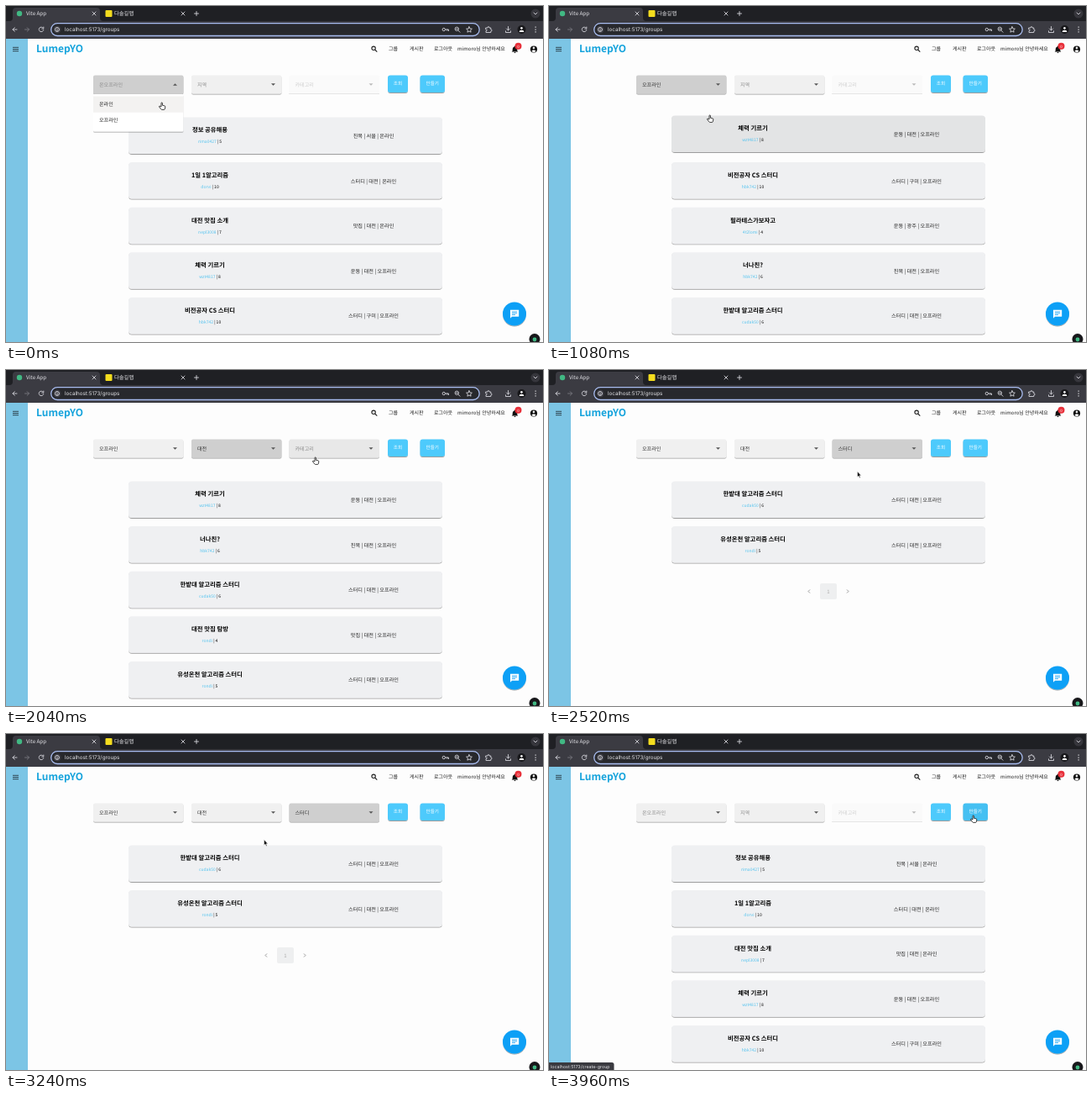
These frames come from a looping animation (640x400 px, 4200 ms). An HTML page:

```html
<!DOCTYPE html>
<html>
<head>
<meta charset="utf-8">
<title>Group search</title>
<style>
  html, body { margin: 0; width: 100%; height: 100%; overflow: hidden; background: #fdfdfd; }
  svg { display: block; }
  text { font-family: 'Noto Sans CJK KR', 'Noto Sans', sans-serif; text-rendering: geometricPrecision; white-space: pre; }
  .ui { font-family: Inter, 'Noto Sans CJK KR', sans-serif; fill: #e6e6ea; }
  .mid { text-anchor: middle; }
  .line { fill: none; stroke: #d2d2d8; stroke-width: .9; stroke-linecap: round; stroke-linejoin: round; }
  .shadow { filter: url(#shadow); }
</style>
</head>
<body>
<svg width="640" height="400" viewBox="0 0 640 400">
  <defs>
    <filter id="shadow" x="-5%" y="-10%" width="110%" height="130%">
      <feDropShadow dx="0" dy="1" stdDeviation=".7" flood-opacity=".38"/>
    </filter>
  </defs>

  <!-- browser -->
  <rect width="640" height="39" fill="#1f2024"/>
  <path d="M4 18q4 0 4-4V6q0-4 4-4h96q4 0 4 4v8q0 4 4 4h524v21H0V18z" fill="#3b3b42"/>
  <circle cx="16" cy="9" r="3.2" fill="#41b883"/>
  <rect x="118.5" y="5" width="8" height="8" rx="1" fill="#f3dc1e"/>
  <g class="ui" font-size="6.3">
    <text x="24" y="11.3">Vite App</text>
    <text x="129" y="11.3">다솔길맵</text>
  </g>
  <path class="line" d="M103 7l4 4m0-4l-4 4M209 7l4 4m0-4l-4 4M224.500 9h5m-2.500-2.500v5"/>
  <circle cx="631" cy="9" r="5.500" fill="#36363c"/>
  <path class="line" d="M629 8l2 2 2-2"/>
  <rect x="53.700" y="20.700" width="510.500" height="14.800" rx="7.400" fill="#27282c" stroke="#a9bdf0" stroke-width="1.300"/>
  <circle cx="61" cy="28" r="4.500" fill="#3b3b42"/>
  <path class="line" d="M13 28H8m2.300-2.300L8 28l2.300 2.300"/>
  <path class="line" d="M22.500 28h5m-2.300-2.300l2.300 2.300-2.300 2.300" style="stroke:#77777e"/>
  <path class="line" d="M44.300 26.200a2.800 2.800 0 1 0 .5 2.300M44.800 25v2h-2"/>
  <path class="line" d="M61 27.800v2M61 26v.1M63.500 28a2.500 2.500 0 1 0-5 0a2.500 2.500 0 1 0 5 0"/>
  <text class="ui" x="70" y="30.300" font-size="6.300">localhost:5173/groups</text>
  <path class="line" d="M523.500 28a1.700 1.700 0 1 0-3.400 0a1.700 1.700 0 1 0 3.400 0h4v1.600m-1.600-1.600v1.300"/>
  <path class="line" d="M539.500 27.300a2.200 2.200 0 1 0-4.400 0a2.200 2.200 0 1 0 4.400 0m-.7 1.700l2.200 2.200m-4.600-3.900h1.800"/>
  <path class="line" d="M552 24.700l1 2.200 2.400.3-1.800 1.600.5 2.400-2.100-1.200-2.100 1.200.5-2.400-1.800-1.600 2.400-.3z"/>
  <path class="line" d="M572 26h2q0-1.500 1-1.500t1 1.500h1.800v2q1.300 0 1.300 1t-1.300 1v1.500H572v-1.800q1.300-.2 1.300-1T572 27.800z"/>
  <path class="line" d="M598.500 24.500v4.500m-2-2l2 2 2-2m-5 2.800v1.700h6v-1.700"/>
  <circle cx="614.500" cy="28" r="5" fill="#17171a"/>
  <path d="M614.500 25a1.400 1.400 0 1 1-.1 0zM611.700 31q0-2.300 2.800-2.300t2.800 2.300z" fill="#fff"/>
  <path d="M630.500 24.500h1.300v1.300h-1.300zm0 2.900h1.300v1.300h-1.300zm0 2.900h1.300v1.300h-1.300z" fill="#d2d2d8"/>

  <!-- page frame -->
  <rect y="39" width="26" height="361" fill="#7cc5e5"/>
  <path d="M8 49.300h7M8 51.500h7M8 53.700h7" stroke="#26363f" stroke-width=".9"/>
  <text x="36" y="55.300" font-size="12" font-weight="700" fill="#15a3dc">LumepYO</text>
  <path d="M440.300 50.300a2.200 2.200 0 1 0-4.400 0a2.200 2.200 0 1 0 4.400 0m-.6 1.700l2.600 2.600" fill="none" stroke="#222" stroke-width="1.100"/>
  <g font-size="6" fill="#222">
    <text x="456" y="53.300">그룹</text>
    <text x="481" y="53.300">게시판</text>
    <text x="510" y="53.300">로그아웃</text>
    <text x="538" y="53.300">mimoro님 안녕하세요</text>
  </g>
  <path d="M602.700 54.500l1-1.200v-2q0-2.300 2-2.800 0-.9.800-.9t.8.900q2 .5 2 2.800v2l1 1.200zM605.500 55h2q0 1-1 1t-1-1z" fill="#111"/>
  <circle cx="610.500" cy="47.700" r="4" fill="#e8303a"/>
  <text class="mid" x="610.500" y="49.500" font-size="4.500" fill="#fff">0</text>
  <circle cx="629" cy="51.500" r="4.100" fill="#111"/>
  <path d="M629 48.600a1.300 1.300 0 1 1-.1 0zM626.500 53.800q.5-1.600 2.500-1.600t2.500 1.600q-1 1.200-2.500 1.200t-2.500-1.200z" fill="#fff"/>
  <circle class="shadow" cx="606" cy="366.500" r="14" fill="#0fa0f6"/>
  <path d="M601 361.700h10.200v8h-8.200l-2 2z" fill="#fff"/>
  <path d="M603 364h6.200m-6.200 1.800h6.200m-6.200 1.800h4" stroke="#0fa0f6" stroke-width=".8"/>
  <circle cx="630" cy="396.500" r="6.500" fill="#18181b"/>
  <circle cx="630" cy="397" r="2.400" fill="#41b883"/>
  <g id="app"></g>
</svg>
<script>
const STEP = 120, LOOP = 4200, LAST = 3960;
const INK = '#222';

const groups = [
  ['정보 공유해용', 'rima0427', 5, '친목 | 서울 | 온라인'],
  ['1일 1알고리즘', 'dorvi', 10, '스터디 | 대전 | 온라인'],
  ['대전 맛집 소개', 'nepl3008', 7, '맛집 | 대전 | 온라인'],
  ['체력 기르기', 'wzt4817', 8, '운동 | 대전 | 오프라인'],
  ['비전공자 CS 스터디', 'hbk742', 10, '스터디 | 구미 | 오프라인'],
  ['필라테스가보자고', '4t2lomi', 4, '운동 | 광주 | 오프라인'],
  ['너나친?', 'hbk742', 6, '친목 | 대전 | 오프라인'],
  ['한밭대 알고리즘 스터디', 'cudak50', 6, '스터디 | 대전 | 오프라인'],
  ['대전 맛집 탐방', 'rondi', 4, '맛집 | 대전 | 오프라인'],
  ['유성온천 알고리즘 스터디', 'rondi', 5, '스터디 | 대전 | 오프라인'],
].map(([title, user, size, tags]) => ({ title, user, size, tags }));

const selects = [
  { x: 104, label: '온오프라인', items: ['온라인', '오프라인'], pick: 1, open: 0, close: 1080 },
  { x: 221, label: '지역', items: ['서울', '대전', '광주', '구미', '부울경'], pick: 1, open: 1440, close: 1920 },
  { x: 337.5, label: '카테고리', items: ['스터디', '맛집', '운동', '친목'], pick: 0, open: 2160, close: 2520 },
];
const CLEARED = 3600, RELOADED = 3720;

// time, x, y of the pointer
const path = [
  [0, 187, 119], [360, 188, 121], [720, 192, 133], [1080, 193, 134], [1320, 245, 98],
  [1560, 247, 97], [1800, 249, 136], [2040, 370, 108], [2160, 370, 100], [2400, 368, 122],
  [2520, 368, 124], [3000, 330, 127], [3240, 308, 129], [3360, 330, 142], [3600, 467, 97],
  [3720, 467, 97], [3960, 507, 101],
];

function pointerAt(t) {
  const i = Math.max(1, path.findIndex(p => p[0] >= t));
  const [t0, x0, y0] = path[i - 1], [t1, x1, y1] = path[i];
  const k = (t - t0) / (t1 - t0);
  return { x: x0 + (x1 - x0) * k, y: y0 + (y1 - y0) * k };
}

const inside = (p, x, y, w, h) => p.x >= x && p.x <= x + w && p.y >= y && p.y <= y + h;
const rect = (x, y, w, h, fill, extra = '') =>
  `<rect x="${x}" y="${y}" width="${w}" height="${h}" fill="${fill}" ${extra}/>`;
const text = (x, y, s, size, fill = INK, extra = '') =>
  `<text x="${x}" y="${y}" font-size="${size}" fill="${fill}" ${extra}>${s}</text>`;

function card({ title, user, size, tags }, i, p, blocked) {
  const top = 132.5 + i * 53.6;
  const hover = !blocked && inside(p, 146, top, 374, 43.5);
  const y = hover ? top - 2 : top;
  return rect(146, y, 374, 43.5, hover ? '#e3e4e5' : '#eff0f2', 'rx="4" class="shadow"') +
    text(243, y + 17.8, title, 7.35, '#000', 'class="mid" font-weight="700"') +
    text(243, y + 30.8, `<tspan fill="#56c4ef">${user}</tspan> | ${size}`, 5, '#000', 'class="mid"') +
    text(438, y + 24.4, tags, 6.2, INK, 'class="mid"');
}

function pager(count) {
  const y = 254 + (count - 2) * 53.6;
  return rect(323, y, 20, 19, '#eeeff0', 'rx="2"') +
    text(333, y + 11.7, '1', 6, '#aaa', 'class="mid"') +
    `<path d="M311 ${y + 7.500}l-2 2 2 2M355 ${y + 7.500}l2 2-2 2" fill="none" stroke="#999"/>`;
}

function select({ x, label, open, close }, value, disabled, focused, t, p) {
  const opened = t >= open && t < close;
  const hover = inside(p, x, 82, 107.5, 27);
  const fill = disabled ? '#fafafa' : focused ? '#cfcfcf' : hover ? '#e8e8e8' : '#f0f0f0';
  const ink = disabled ? '#cfcfcf' : value ? '#333' : '#8c8c8c';
  const arrow = opened ? 'm-2.500 1.200h5l-2.500-2.500z' : 'm-2.500-1.200h5l-2.500 2.500z';
  return rect(x, 82.5, 107.5, 22, fill, `rx="2" ${disabled ? '' : 'class="shadow"'}`) +
    (disabled ? `<path d="M${x} 104.500h107.500" stroke="#bbb" stroke-width=".7" stroke-dasharray="1 1"/>` : '') +
    text(x + 7, 95.5, value || label, 6.1, ink) +
    `<path d="M${x + 97.5} 93.500${arrow}" fill="${disabled ? '#bbb' : '#555'}"/>`;
}

function menu({ x, items, pick, close }, t, p) {
  const pitch = 19.25, top = 107.5;
  const rows = items.map((item, i) => {
    const y = top + i * pitch;
    const hover = inside(p, x, y, 107.5, pitch);
    const pressed = i === pick && t >= close - STEP;
    return (hover ? rect(x, y, 107.5, pitch, '#f3f2f1') : '') +
      (pressed ? rect(x + 5, y, 70, pitch, '#b6b6b6', 'rx="4"') : '') +
      text(x + 7, y + 11.7, item, 6.1, '#222');
  });
  return rect(x, 105, 107.5, items.length * pitch + 6, '#fff', 'rx="1.5" class="shadow"') + rows.join('');
}

function button(x, w, label, p) {
  const hover = inside(p, x, 82, w, 21);
  return rect(x, 82.5, w, 20.5, hover ? '#45c0f2' : '#4dcafc', 'rx="3" class="shadow"') +
    text(x + w / 2, 94.3, label, 5.6, '#fff', 'class="mid"');
}

function pointer({ x, y }, hand) {
  return hand
    ? `<path transform="translate(${x - 1} ${y})" fill="#fff" stroke="#111" stroke-width=".8"
        d="M-1-3.200q0-.9.7-.9t.7.900v2.400l2.500.6q1 .3.900 1.300l-.4 2.300q-.2 1-1 1h-2.600q-.7 0-1.200-.7l-2-2.700q-.3-.8.500-.9l1.900.8z"/>`
    : `<path transform="translate(${x - .5} ${y})" fill="#111" stroke="#fff" stroke-width=".5"
        d="M0-3.200v6.700l1.500-1.400 1.100 2.300 1-.5-1-2.200h2z"/>`;
}

function draw(t) {
  const p = pointerAt(t);
  const chosen = until => selects.map(s => t >= s.close && t < until ? s.items[s.pick] : '');
  const values = chosen(CLEARED);
  const filters = chosen(RELOADED).filter(Boolean);
  const shown = groups.filter(g => filters.every(f => g.tags.split(' | ').includes(f))).slice(0, 5);
  const openMenu = selects.find(s => t >= s.open && t < s.close);
  const focus = t < CLEARED ? selects.findLastIndex(s => t >= s.open) : -1;
  const onCreate = inside(p, 493.5, 82, 29.5, 21);
  const hand = openMenu || p.y < 110 || p.y > 130;

  return shown.map((g, i) => card(g, i, p, openMenu)).join('') +
    pager(shown.length) +
    selects.map((s, i) => select(s, values[i], i === 2 && !values[1], i === focus, t, p)).join('') +
    button(455, 24, '조회', p) + button(493.5, 29.5, '만들기', p) +
    (openMenu ? menu(openMenu, t, p) : '') +
    (onCreate ? '<path d="M0 391h75q2.500 0 2.500 2.500V400H0z" fill="#3a3a40"/>' +
      text(2, 397.6, 'localhost:5173/create-group', 5.3, '#eee', 'class="ui"') : '') +
    pointer(p, hand);
}

const app = document.getElementById('app');
let drawn = -1;
function tick() {
  const t = Math.min(LAST, Math.floor(performance.now() % LOOP / STEP) * STEP);
  if (t !== drawn) app.innerHTML = draw(drawn = t);
  requestAnimationFrame(tick);
}
tick();
</script>
</body>
</html>
```
